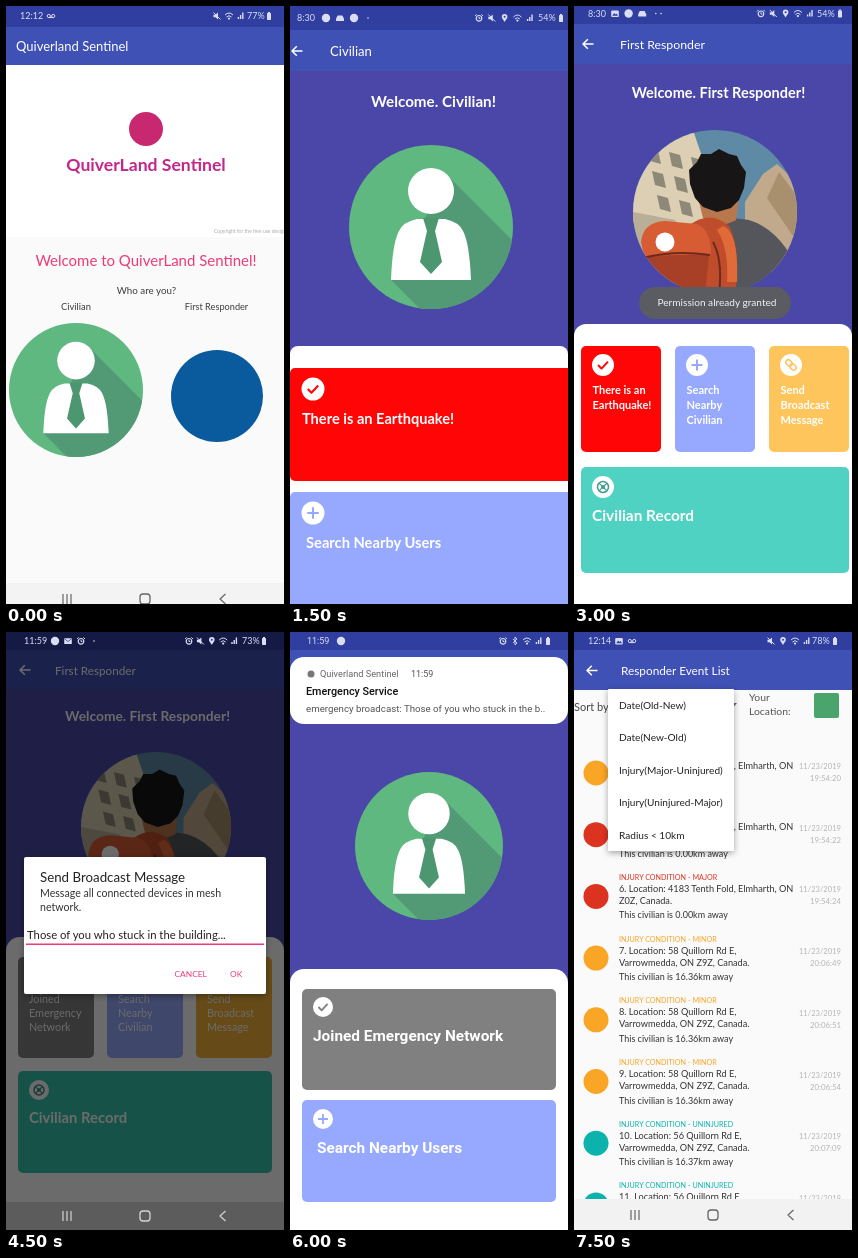
These frames come from a looping animation (278 by 598 pixels, 8 s). An HTML page:

```html
<!DOCTYPE html>
<html lang="en">
<head>
<meta charset="utf-8">
<title>Emergency app walkthrough</title>
<style>
  html, body { margin: 0; width: 100%; height: 100%; overflow: hidden; background: #fafafa; }
  svg { position: absolute; left: 0; top: 0; width: 278px; height: 598px; display: block; }
  .screen { visibility: hidden; }
  .screen.on { visibility: visible; }
  text { font-family: Lato, "Open Sans", sans-serif; white-space: pre; }
  .roboto text { font-family: Roboto, sans-serif; }
</style>
</head>
<body>
<svg id="stage" viewBox="0 0 278 598"></svg>
<script>
const W = 278, H = 598, LOOP = 8000;
const APP = 'Quiverland Sentinel';
const C = {
  status: '#303f9f', tool: '#3f51b5', purple: '#4a47a8', red: '#ff0505', lavender: '#96a9ff',
  amber: '#fdc55c', teal: '#4fd2c2', grey: '#808080', pink: '#ee3a76', ink: '#3c3c3c', pale: '#d9def5'
};

// Drawing helpers
const at = (x, y, body, scale = 1) => `<g transform="translate(${x} ${y}) scale(${scale})">${body}</g>`;
const rect = (x, y, w, h, fill, r = 0, more = '') =>
  `<rect x="${x}" y="${y}" width="${w}" height="${h}" rx="${r}" fill="${fill}" ${more}/>`;
const circle = (x, y, r, fill, more = '') => `<circle cx="${x}" cy="${y}" r="${r}" fill="${fill}" ${more}/>`;
const shape = (d, fill, more = '') => `<path d="${d}" fill="${fill}" ${more}/>`;
const stroke = (d, color, width = 1) =>
  `<path d="${d}" fill="none" stroke="${color}" stroke-width="${width}" stroke-linejoin="round"/>`;
const text = (x, y, size, fill, str, weight = 400, anchor = 'start') =>
  `<text x="${x}" y="${y}" font-size="${size}" fill="${fill}" font-weight="${weight}" text-anchor="${anchor}">${str.replace(/</g, '&lt;')}</text>`;
const centered = (x, y, size, fill, str, weight) => text(x, y, size, fill, str, weight, 'middle');
const lines = (x, y, step, size, fill, list, weight) =>
  list.map((s, i) => text(x, y + i * step, size, fill, s, weight)).join('');

// Status bar symbols, drawn around their own centre
const symbols = {
  mute: shape('M-3.5-1.3h2L1-3.5v7L-1.5 1.3h-2z', C.pale) + stroke('M-3.5-3.5L3.5 3.5', C.pale),
  wifi: stroke('M-4-1Q0-5 4-1M-2.5 1Q0-1.6 2.5 1', C.pale) + circle(0, 2.6, 1.1, C.pale),
  signal: stroke('M-2.6 3V1M-.4 3V-1M1.8 3V-3.5', C.pale, 1.4),
  alarm: circle(0, .3, 2.8, 'none', `stroke="${C.pale}" stroke-width="1.2"`) +
    stroke('M0-1.2V.5H1.4M-4-2L-2.4-3.6M4-2L2.4-3.6', C.pale),
  pin: shape('M0 4C-1.5 1.6-2.8.5-2.8-1.2A2.8 2.8 0 0 1 2.8-1.2C2.8.5 1.5 1.6 0 4z', C.pale) + circle(0, -1.2, 1, C.status),
  blue: stroke('M-2-2L2 2L0 4V-4L2-2L-2 2', C.pale, .9),
  battery: rect(-2, -3, 4, 7, C.pale, .7) + rect(-1, -4, 2, 1.2, C.pale),
  voicemail: stroke('M-2.2 1.6H2.2', C.pale) + circle(-2.2, 0, 1.6, 'none', `stroke="${C.pale}"`) +
    circle(2.2, 0, 1.6, 'none', `stroke="${C.pale}"`),
  image: rect(-3.8, -3, 7.6, 6.4, C.pale, 1) + shape('M-2.8 2.2L-.8-.4L.6 1L1.6 0L3 2.2z', C.status),
  mail: rect(-3.8, -2.8, 7.6, 5.8, C.pale, .6) + stroke('M-3.4-2.2L0 .6L3.4-2.2', C.status, .8),
  car: shape('M-4 3V.8L-2.4-2.4H2.4L4 .8V3z', C.pale),
  disc: circle(0, 0, 4.2, C.pale),
  dot: circle(0, 0, .8, C.pale)
};
const row = (names, x, y, step) =>
  names.split(' ').map((n, i) => at(x + i * step, y, symbols[n])).join('');

function statusBar({ h, y, time, x, left, leftX, leftStep = 13, right, rightX, rightStep = 12, charge, chargeX, batteryX, fill = C.status }) {
  return rect(0, 0, W, h, fill) + text(x, y + 3.3, 9, C.pale, time) + row(left, leftX, y, leftStep) +
    row(right, rightX, y, rightStep) + text(chargeX, y + 3.3, 9, C.pale, charge) + at(batteryX, y, symbols.battery);
}
const backArrow = (x, y, color = '#fff') =>
  stroke(`M${x + 5.5} ${y}H${x - 5}M${x - .2} ${y - 4.8}L${x - 5} ${y}L${x - .2} ${y + 4.8}`, color, 1.5);
const navBar = (top, y, fill, color) => rect(0, top, W, H - top, fill) +
  stroke(`M57 ${y - 5}v10M61 ${y - 5}v10M65 ${y - 5}v10M219.5 ${y - 5}l-5.5 5l5.5 5`, color, 1.2) +
  rect(134, y - 5, 10, 10, 'none', 3, `stroke="${color}" stroke-width="1.3"`);

// White badge with a glyph in the card's colour
const glyphs = {
  check: c => stroke('M-5 0L-1.5 3.6L5-3.4', c, 2),
  plus: c => stroke('M-5.5 0H5.5M0-5.5V5.5', c, 2),
  link: c => at(0, 0, `<g transform="rotate(45)" stroke="${c}" stroke-width="1.5">` +
    rect(-6.4, -2.5, 7, 5, 'none', 2.5) + rect(-.6, -2.5, 7, 5, 'none', 2.5) + '</g>'),
  record: c => circle(0, 0, 5.5, 'none', `stroke="${c}" stroke-width="1.5"`) +
    stroke('M-3.7-3.7L3.7 3.7M3.7-3.7L-3.7 3.7', c, 1.2) + circle(0, 0, 2, c)
};
const badge = (x, y, glyph, color, r = 11) => at(x, y, circle(0, 0, 11, '#fff') + glyphs[glyph](color), r / 11);
const sheet = (y, r) => rect(0, y, W, H - y + r, '#fff', r);

const civilian = (x, y, r) => at(x, y,
  circle(0, 0, 82, '#5fb880') +
  `<g clip-path="url(#round)">${shape('M17-51L110 42V110H17L-40 53z', '#519a75')}</g>` +
  circle(0, -36, 23, '#fff') +
  shape('M-40 53C-39 30-37 14-32 4Q-28-5-14-8H14Q28-5 32 4C37 14 39 30 40 53z', '#fff') +
  shape('M-8-9H8L4 4L11 35L0 47L-11 35L-4 4z', '#4c9670'), r / 82);

function rescuer(x, y, r) {
  let windows = '';
  for (let i = 0; i < 3; i++) for (let j = 0; j < 3; j++)
    windows += shape(`M${-68 + i * 22 + j * 5} ${-65 + j * 24 + i * 5}l11 3l3 14l-11-3z`, '#8d8878');
  return at(x, y, '<g clip-path="url(#round)">' +
    rect(-82, -82, 164, 164, '#5f8aa5') +
    shape('M-82-82H-22L-6-35L-12 20L-82 12z', '#dccfb3') + windows +
    shape('M-82 0L-40 8L-20 30V82H-82z', '#b9ae98') +
    shape('M30-10L48-38L62-48L82-30V60H30z', '#c1aa8b') + shape('M52-14L64-40L82-16V30z', '#a8906f') +
    shape('M-24 18Q0 2 34 8Q66 18 84 60V84H-40z', '#54565b') +
    shape('M-19-22H25L21 8Q3 18-12 6z', '#b9774d') +
    shape('M-25-28L-26-42L-18-50L-14-58L-4-58L4-63L14-58L22-56L26-47L31-40L29-24L24-12L16-4L2 0L-12-5L-20-14z', '#171515') +
    shape('M-24 12Q-4-2 14 14Q26 36 20 84H-28z', '#bf4c2a') +
    shape('M8 14Q24 20 22 70H12Q14 36 2 18z', '#e06a38') +
    shape('M-74 30Q-72 10-50 9L-18 12Q-4 18-4 42L-70 48z', '#d85c33') +
    shape('M-72 44L-6 42L-10 84H-66z', '#a83f27') +
    stroke('M-72 46Q-40 38-5 43M-2 30Q8 48 4 82', '#6d2a1d', 2) +
    circle(-50, 30, 9.5, '#fff') + '</g>', r / 82);
}

function welcomeScreen() {
  return rect(0, 0, W, H, '#fafafa') + rect(0, 58, W, 173, '#fff') +
    statusBar({ h: 21, y: 10, time: '12:12', x: 14, left: 'voicemail', leftX: 45, right: 'mute wifi signal', rightX: 211, charge: '77%', chargeX: 241, batteryX: 263 }) +
    rect(0, 21, W, 38, C.tool) + text(10, 45, 13, '#fff', APP) +
    circle(140, 123, 17, '#c8286f') +
    centered(140, 165, 17.6, '#c4268a', 'QuiverLand Sentinel', 700) +
    text(208, 227, 5, '#aaa', 'Copyright for the free use design') +
    centered(140, 260, 15, C.pink, 'Welcome to QuiverLand Sentinel!') +
    centered(140.5, 288, 9.8, C.ink, 'Who are you?') +
    centered(70, 304, 9.4, C.ink, 'Civilian') + centered(210.5, 304, 9.2, C.ink, 'First Responder') +
    civilian(70, 384, 67) + circle(211, 390, 46, '#0a5a9e') + navBar(577, 593, '#f3f3f3', '#666');
}

function civilianScreen() {
  return rect(0, 0, W, H, C.purple) +
    statusBar({ h: 24, y: 12, time: '8:30', x: 7, left: 'disc car disc dot', leftX: 36, leftStep: 14, right: 'alarm mute pin wifi signal', rightX: 189, rightStep: 12.8, charge: '54%', chargeX: 248, batteryX: 271 }) +
    rect(0, 24, W, 41, C.tool) + backArrow(7, 45) + text(40, 49.5, 13.1, '#fff', 'Civilian') +
    centered(143.5, 101, 15.2, '#fff', 'Welcome. Civilian!', 700) + civilian(141, 221, 82) +
    sheet(340, 8) +
    rect(0, 362, W + 6, 113, C.red, 5) + badge(23, 383, 'check', C.red, 11.5) +
    text(12, 418, 14.6, '#fff', 'There is an Earthquake!', 700) +
    rect(0, 486, W + 6, 120, C.lavender, 5) + badge(23, 507, 'plus', C.lavender, 11.5) +
    text(16, 542, 14.7, '#fff', 'Search Nearby Users', 700);
}

function responderScreen() {
  const cards = [
    [7, C.red, 'check', ['There is an', 'Earthquake!']],
    [101, C.lavender, 'plus', ['Search', 'Nearby', 'Civilian']],
    [195, C.amber, 'link', ['Send', 'Broadcast', 'Message']]
  ];
  return rect(0, 0, W, H, C.purple) +
    statusBar({ h: 18, y: 7.5, time: '8:30', x: 14, left: 'image disc car dot', leftX: 41, leftStep: 13.6, right: 'alarm mute pin wifi signal', rightX: 187, rightStep: 12.3, charge: '54%', chargeX: 243, batteryX: 266 }) +
    at(87, 7.5, symbols.dot) +
    rect(0, 18, W, 40, C.tool) + backArrow(14, 38) + text(46, 43, 12.3, '#fff', 'First Responder') +
    centered(144.5, 92, 14.5, '#fff', 'Welcome. First Responder!', 700) + rescuer(141, 206, 82) +
    sheet(318, 12) + rect(65, 281, 152, 32, '#5b5b62', 16) +
    centered(143, 300, 10.1, '#f2f2f2', 'Permission already granted') +
    cards.map(([x, color, glyph, words]) => rect(x, 340, 80, 106, color, 5) +
      badge(x + 22, 359, glyph, color) + lines(x + 11.5, 388, 15, 11, '#fff', words, 700)).join('') +
    rect(7, 461, 268, 106, C.teal, 5) + badge(29, 481, 'record', '#3f9d92') +
    text(18, 515, 15.4, '#fff', 'Civilian Record', 700);
}

function broadcastScreen() {
  const cards = [
    [12, C.grey, ['Joined', 'Emergency', 'Network']],
    [101, C.lavender, ['Search', 'Nearby', 'Civilian']],
    [190, '#f5b33a', ['Send', 'Broadcast', 'Message']]
  ];
  return rect(0, 0, W, H, C.purple) + rect(0, 18, W, 39, C.tool) +
    backArrow(19, 38) + text(49, 42.5, 11.7, '#fff', 'First Responder') +
    centered(141.5, 89, 13.8, '#fff', 'Welcome. First Responder!', 700) + rescuer(150, 195, 75) +
    sheet(305, 14) +
    cards.map(([x, color, words]) => rect(x, 325, 76, 101, color, 5) +
      lines(x + 11, 371, 14, 10.8, '#fff', words)).join('') +
    rect(12, 439, 254, 102, '#36c5af', 5) + badge(33, 458, 'record', '#36877c', 10) +
    text(23, 491, 14.8, '#fff', 'Civilian Record', 700) +
    rect(0, 0, W, H, '#000', 0, 'opacity=".58"') + navBar(570, 584, '#5c5c5c', '#d4d4d4') +
    statusBar({ h: 18, y: 9, time: '11:59', x: 18, left: 'disc mail alarm dot', leftX: 49, right: 'alarm mute pin wifi signal', rightX: 183, rightStep: 11.4, charge: '73%', chargeX: 236, batteryX: 258, fill: '#141a43' }) +
    rect(18, 225, 242, 137, '#fff', 2, 'filter="url(#shadow)"') +
    text(34, 250, 13.3, '#222', 'Send Broadcast Message') +
    lines(34, 265, 14, 10.6, '#333', ['Message all connected devices in mesh', 'network.']) +
    text(21, 307, 11.3, '#222', 'Those of you who stuck in the building...') +
    rect(20, 311.5, 238, 1.5, C.pink) +
    text(168.5, 344.5, 8.4, C.pink, 'CANCEL') + text(224, 344.5, 8.4, C.pink, 'OK');
}

function alertScreen() {
  return '<g class="roboto">' + rect(0, 0, W, H, C.purple) + rect(0, 18, W, 39, C.tool) +
    statusBar({ h: 18, y: 9, time: '11:59', x: 17, left: 'disc', leftX: 51, right: 'alarm blue wifi signal', rightX: 213, charge: '', chargeX: 0, batteryX: 258 }) +
    rect(0, 25, W, 67, '#fff', 14) + circle(21, 42, 3.5, '#777') +
    text(30, 45, 9.2, '#666', APP) + text(121, 45, 9, '#555', '11:59') +
    text(16, 63, 10.8, '#111', 'Emergency Service', 500) +
    text(16, 80, 9.7, '#555', 'emergency broadcast: Those of you who stuck in the b..') +
    civilian(139, 214, 74) + sheet(337, 14) +
    rect(12, 357, 254, 101, C.grey, 5) + badge(33, 375, 'check', C.grey, 10) +
    text(23, 409, 15.4, '#fff', 'Joined Emergency Network', 700) +
    rect(12, 468, 254, 102, C.lavender, 5) + badge(33, 487, 'plus', C.lavender, 10) +
    text(27, 520.5, 15.4, '#fff', 'Search Nearby Users', 700) + '</g>';
}

function eventScreen() {
  const levels = { MAJOR: '#dc3220', MINOR: '#f9a526', UNINJURED: '#0bb3ac' };
  const near = ['4183 Tenth Fold, Elmharth, ON', 'Z0Z, Canada.', '0.00'];
  const far = ['58 Quillorn Rd E,', 'Varrowmedda, ON Z9Z, Canada.', '16.36'];
  const last = ['56 Quillorn Rd E,', far[1], '16.37'];
  const events = [
    ['MINOR', near, '19:54:20'], ['MAJOR', near, '19:54:22'], ['MAJOR', near, '19:54:24'],
    ['MINOR', far, '20:06:49'], ['MINOR', far, '20:06:51'], ['MINOR', far, '20:06:54'],
    ['UNINJURED', last, '20:07:09'], ['UNINJURED', last, '20:07:11']
  ];
  const list = events.map(([level, [street, town, km], time], i) => at(0, 141 + i * 61.7,
    circle(22, 0, 12.5, levels[level]) + text(45, -16.5, 7.2, levels[level], 'INJURY CONDITION - ' + level) +
    lines(45, -4.5, 12, 9.2, '#333', [`${i + 4}. Location: ${street}`, town]) +
    text(45, 22, 9, '#333', `This civilian is ${km}km away`) +
    text(267, -4, 7.6, '#b5b5b5', '11/23/2019', 400, 'end') + text(267, 8, 7.8, '#b5b5b5', time, 400, 'end'))).join('');
  const options = ['Date(Old-New)', 'Date(New-Old)', 'Injury(Major-Uninjured)', 'Injury(Uninjured-Major)', 'Radius < 10km'];
  return rect(0, 0, W, H, '#fafafa') + list + text(0, 79, 11, '#444', 'Sort by:') +
    shape('M156 71h7l-3.5 4z', '#666') + lines(175, 68.5, 14, 10.4, '#555', ['Your', 'Location:']) +
    rect(240, 61, 25, 25, '#4aa56c', 2) +
    rect(0, 18, W, 40, C.tool) +
    statusBar({ h: 18, y: 9, time: '12:14', x: 14, left: 'image voicemail', leftX: 45, right: 'mute pin wifi signal', rightX: 197, charge: '78%', chargeX: 238, batteryX: 261 }) +
    backArrow(18, 38.5) + text(47, 42.5, 11.8, '#fff', 'Responder Event List') +
    rect(34, 57, 126, 162, '#fff', 1, 'filter="url(#shadow)"') +
    lines(45, 77, 32.4, 10.1, '#222', options) + navBar(567, 583, '#f2f2f2', '#666');
}

const timeline = [
  [0, welcomeScreen], [1500, civilianScreen], [3000, responderScreen],
  [4500, broadcastScreen], [6000, alertScreen], [7500, eventScreen]
];
const stage = document.getElementById('stage');
stage.innerHTML = `<defs><clipPath id="round"><circle r="82"/></clipPath>
  <filter id="shadow" x="-10%" y="-10%" width="120%" height="120%"><feDropShadow dx="0" dy="2" stdDeviation="3" flood-opacity=".35"/></filter></defs>` +
  timeline.map(([, draw]) => `<g class="screen">${draw()}</g>`).join('');
const screens = [...stage.querySelectorAll('.screen')];

const start = performance.now();
function tick(now) {
  const t = Math.max(0, now - start) % LOOP;
  const current = timeline.filter(([from]) => from <= t).length - 1;
  screens.forEach((s, i) => s.classList.toggle('on', i === current));
  requestAnimationFrame(tick);
}
tick(start);
</script>
</body>
</html>
```
